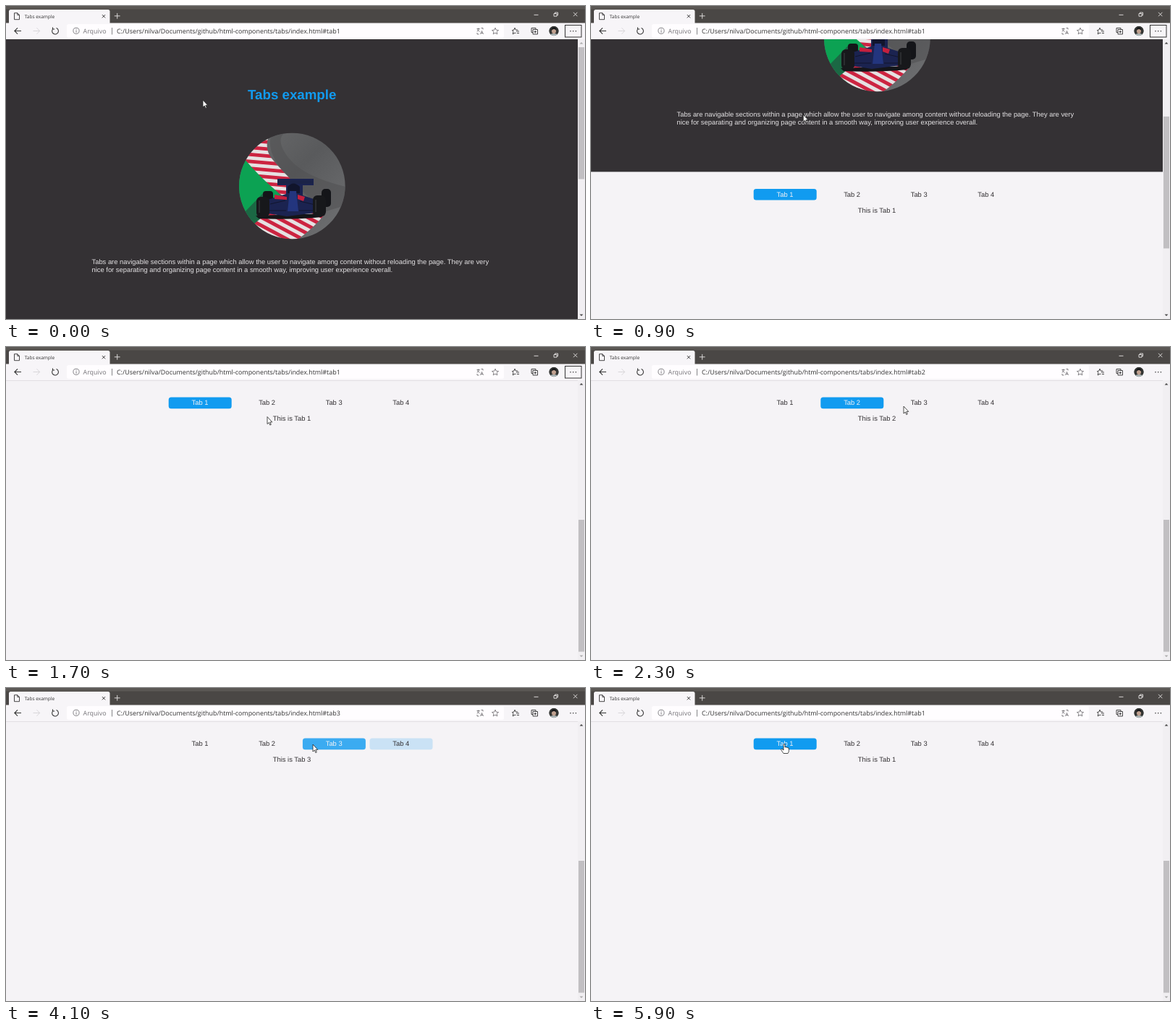
Recreate the animation shown at these times as an HTML page. Size 800 by 433 pixels, loop 6000 ms.

```html
<!DOCTYPE html>
<html lang="en">
<head>
<meta charset="utf-8">
<title>Tabs example</title>
<style>
  html, body { margin: 0; width: 100%; height: 100%; overflow: hidden; background: #f5f3f6; }
  svg { display: block; width: 800px; height: 433px; }
  text { font: 9.39px "Liberation Sans", Arial, sans-serif; text-rendering: geometricPrecision; }
  .ui { font: 8.92px "Open Sans", "Noto Sans", sans-serif; }
  .mid { text-anchor: middle; }
  .line { fill: none; stroke: #333; stroke-width: .9; }
</style>
</head>
<body>
<svg viewBox="0 0 800 433">
  <defs>
    <clipPath id="view"><rect y="46" width="790" height="387"/></clipPath>
    <clipPath id="round"><circle cx="395.3" cy="249" r="73.3"/></clipPath>
    <clipPath id="face"><circle cx="757" cy="34.5" r="6.8"/></clipPath>
    <linearGradient id="road" x2="1" y2="1">
      <stop offset="0" stop-color="#6b6c6d"/>
      <stop offset=".45" stop-color="#595a5c"/>
      <stop offset="1" stop-color="#717274"/>
    </linearGradient>
    <pattern id="kerbTop" width="200" height="9.6" patternUnits="userSpaceOnUse" patternTransform="rotate(5)">
      <rect width="200" height="9.6" fill="#e6e1e2"/><rect width="200" height="4.8" fill="#cc2441"/>
    </pattern>
    <pattern id="kerbLow" width="200" height="10" patternUnits="userSpaceOnUse" patternTransform="rotate(28)">
      <rect width="200" height="10" fill="#e6e1e2"/><rect width="200" height="5" fill="#cc2441"/>
    </pattern>
  </defs>

  <rect width="800" height="433" fill="#f5f3f6"/>
  <g clip-path="url(#view)">
    <g id="page">
      <rect y="46" width="790" height="387.4" fill="#343134"/>
      <text class="mid" x="395.2" y="129.3" fill="#119bf0" style="font-size:18.7px;font-weight:bold">Tabs example</text>
      <g clip-path="url(#round)">
        <rect x="321" y="175" width="149" height="148" fill="url(#road)"/>
        <path d="M366 180Q360 202 384 230T442 284L469 276V250Q412 236 392 212T384 176Z" fill="#505153" opacity=".55"/>
        <path d="M321 205L332 211L360 240L384 268L352 316L321 306Z" fill="#0ca253"/>
        <path d="M325 290L356 258L376 268L352 312Z" fill="#1b6844"/>
        <path d="M365 176Q355 196 368 212T404 250L384 264Q356 243 328 210L340 176Z" fill="url(#kerbTop)"/>
        <path d="M342 302L364 284L442 286Q424 309 400 325H362Z" fill="url(#kerbLow)"/>
        <g fill="#141519">
          <path d="M345 290L440 287L436 292Q396 296 349 294Z"/>
          <rect x="355" y="256" width="14" height="20" rx="4"/>
          <rect x="436" y="253" width="13" height="25" rx="5"/>
        </g>
        <path d="M375 239H425V248H410V262L428 268V286L388 291L362 287V268L387 260V248H375Z" fill="#1b2350"/>
        <path d="M376 241H424V246H376Z" fill="#1b2347"/>
        <path d="M389 250Q397 241 406 250V259H389Z" fill="#11152c"/>
        <path d="M392 256H401L404 284H389Z" fill="#23357e"/>
        <path d="M371 261L388 264V268L371 267ZM403 261L413 264L411 270L403 267ZM434 276H441V288H434Z" fill="#c4203e"/>
        <path d="M365 274L386 269M406 270L427 275M364 283H387M405 283H426" class="line" style="stroke:#10132a"/>
        <g fill="#17181b">
          <rect x="346" y="264" width="18" height="28" rx="6"/>
          <rect x="424" y="262" width="18" height="29" rx="6"/>
        </g>
        <path d="M350 269V286M428 268V285" class="line" style="stroke:#45464a"/>
      </g>
      <g fill="#e3e1e3">
        <text x="118.5" y="357.4">Tabs are navigable sections within a page which allow the user to navigate among content without reloading the page. They are very</text>
        <text x="118.5" y="368.1">nice for separating and organizing page content in a smooth way, improving user experience overall.</text>
      </g>
      <g id="tabs"></g>
      <text id="content" class="mid" x="395" y="489.8" fill="#343134"></text>
    </g>
  </g>

  <rect x="790" y="46" width="10" height="387" fill="#f1eff2"/>
  <rect id="thumb" x="791" y="57" width="8" height="182.5" fill="#c1bfc2"/>
  <path id="up" d="M792.6 52.6L795 50L797.4 52.6Z"/>
  <path id="down" d="M792.6 426.4L795 429L797.4 426.4Z"/>

  <rect width="800" height="24" fill="#4a4745"/>
  <rect width="800" height="4.5" fill="#5b5855"/>
  <rect y="23.5" width="800" height="22.5" fill="#f7f5f8"/>
  <path d="M4 24V7.5Q4 5 6.5 5H141Q143.5 5 143.5 7.5V24Z" fill="#f7f5f8"/>
  <text class="ui" x="25.8" y="16.6" fill="#333" style="font-size:6.5px">Tabs example</text>
  <path class="line" d="M11.5 9.7H15.8L18.5 12.4V18.7H11.5ZM15.8 9.7V12.4H18.5"/>
  <path class="line" d="M132.8 12L137.2 16.4M137.2 12L132.8 16.4"/>
  <path class="line" style="stroke:#e8e6e5" d="M149.8 13.8H157.6M153.7 9.9V17.7M729.5 12.3H735.5M784 8.8L789.4 14.2M789.4 8.8L784 14.2M757 10.5H761V14.2H757ZM758.5 10.3V9H762.5V12.8H761"/>

  <rect x="84" y="25" width="604" height="19" rx="2.5" fill="#fffdff"/>
  <path class="line" d="M21 34.5H12M16 30.3L11.8 34.5L16 38.7" style="stroke-width:1.1"/>
  <path class="line" d="M37.5 34.5H46.5M42.5 30.3L46.7 34.5L42.5 38.7" style="stroke:#d5d3d6"/>
  <path class="line" d="M65.2 31.3A4.4 4.4 0 1 0 69.5 30.5M64.5 29.5V32H67.2" style="stroke-width:1.1"/>
  <g class="line" style="stroke:#77757a">
    <circle cx="97" cy="34.3" r="4.1"/>
    <path d="M97 33.5V36.8M97 31.7V32.7M146.5 30V39.5"/>
  </g>
  <text class="ui" x="106.5" y="37.7" fill="#77757a">Arquivo</text>
  <text class="ui" id="url" x="153" y="37.7" fill="#333"></text>
  <g class="line" style="stroke:#666468;stroke-width:.8">
    <path d="M650.5 31.5H654.5M652.5 30.5V31.5M651 35.5L654 31.5M651 32.5L654.5 35.5M655.5 39L657.5 34.5L659.5 39M656.2 37.5H658.8M656.5 30.5H659V32.5M653.5 39H651V37"/>
    <path d="M676 30.2L677.3 33.2L680.5 33.5L678.1 35.7L678.8 38.9L676 37.2L673.2 38.9L673.9 35.7L671.5 33.5L674.7 33.2Z"/>
  </g>
  <g class="line">
    <path d="M703 30.2L704.3 33L707.3 33.2M704.5 37.5L703 37.2L700.2 38.9L700.9 35.7L699.5 33.5L701.7 33.2L703 30.2M705 35H709M706 37.5H709"/>
    <path d="M726 30.5H732V32.5M726 30.5V36.5H728M728 32.5H734.5V39H728ZM731.2 34V37.5M729.5 35.7H733"/>
  </g>
  <g clip-path="url(#face)">
    <circle cx="757" cy="34.5" r="7" fill="#343634"/>
    <path d="M750 42Q751 38 757 38T764 42Z" fill="#aab4b6"/>
    <ellipse cx="757" cy="34.6" rx="3" ry="3.8" fill="#c0a190"/>
    <path d="M753.6 34Q753.4 29.6 757 29.6T760.4 34Q759 32 757 32T753.6 34Z" fill="#17181a"/>
  </g>
  <rect id="focus" x="772.5" y="26.5" width="22.5" height="16.5" fill="none" stroke="#333"/>
  <g fill="#333"><circle cx="780" cy="34.7" r=".8"/><circle cx="783.7" cy="34.7" r=".8"/><circle cx="787.4" cy="34.7" r=".8"/></g>

  <g stroke="#222" stroke-width=".8" stroke-linejoin="round" fill="#fff">
    <path id="arrow" d="M0 0V10L2.3 8L3.8 11.5L5.3 10.8L3.8 7.4H6.8Z"/>
    <path id="hand" d="M-1 1Q0 -.5 1 1V5Q2.3 4 3 5.3Q4.4 4.5 5 5.9Q6.4 5.5 6.4 7V9.5Q6.4 11.5 5 13.5H-1Q-2.5 11.5 -4.3 8.5Q-4.6 7 -3.2 7.2L-1 9Z"/>
  </g>
</svg>
<script>
const LOOP = 6000, STEP = 100, FADE = 370, MAX_SCROLL = 387.3;
const TAB_X = 268, TAB_GAP = 92.6;

// [time, scroll offset]
const scrollKeys = [[200, 0], [300, 24], [400, 58], [500, 72], [600, 109.6], [700, 138],
  [900, 204], [1100, 256], [1300, 290.4], [1400, 290.4], [1500, 318], [1600, 358], [1700, MAX_SCROLL]];
// [time, x, y] of the pointer's hot spot
const pointerKeys = [[0, 272, 130], [600, 273, 148], [1000, 300, 151], [1300, 358, 162], [1600, 361, 115],
  [1800, 361, 78], [2100, 366, 79], [2300, 432, 82], [2500, 453, 78], [2750, 457, 78],
  [3100, 540, 78], [3250, 540, 78], [3400, 520, 78], [3700, 456, 78], [4000, 453, 78],
  [4300, 366, 78], [4500, 360, 78], [4800, 285, 80], [5100, 270, 78], [5900, 267, 77]];
// [time, selected tab]
const clicks = [[-1000, 1], [1900, 2], [2600, 3], [3200, 4], [3800, 3], [4400, 2], [5200, 1]];

const $ = id => document.getElementById(id);
const svg = (name, attrs, parent) => {
  const el = document.createElementNS("http://www.w3.org/2000/svg", name);
  for (const key in attrs) el.setAttribute(key, attrs[key]);
  return parent.appendChild(el);
};

const tabs = [1, 2, 3, 4].map((n, i) => {
  const x = TAB_X + i * TAB_GAP;
  const box = svg("rect", { x: x - 43.3, y: 456.9, width: 87, height: 15.6, rx: 3.5, fill: "#119bf0" }, $("tabs"));
  const label = svg("text", { x, y: 467.5, class: "mid" }, $("tabs"));
  label.textContent = "Tab " + n;
  return { x, box, label };
});

// Linear interpolation between the keys around time t
function sample(keys, t) {
  const next = keys.findIndex(k => k[0] > t);
  if (next === 0) return keys[0].slice(1);
  if (next < 0) return keys[keys.length - 1].slice(1);
  const a = keys[next - 1], b = keys[next];
  const p = (t - a[0]) / (b[0] - a[0]);
  return a.slice(1).map((v, i) => v + (b[i + 1] - v) * p);
}

function show(el, on) {
  el.setAttribute("visibility", on ? "visible" : "hidden");
}

function draw(t) {
  const [scroll] = sample(scrollKeys, t);
  $("page").setAttribute("transform", `translate(0 ${-scroll})`);
  $("thumb").setAttribute("y", 57 + scroll * 0.47);
  $("up").setAttribute("fill", scroll > 0 ? "#444" : "#aaa");
  $("down").setAttribute("fill", scroll < MAX_SCROLL ? "#444" : "#aaa");

  const current = clicks.filter(c => c[0] <= t).length - 1;
  const [time, active] = clicks[current];
  const previous = current ? clicks[current - 1][1] : 0;
  const p = Math.min(1, (t - time) / FADE);
  tabs.forEach(({ box, label }, i) => {
    const n = i + 1;
    box.setAttribute("opacity", n === active ? p : n === previous ? 1 - p : 0);
    label.setAttribute("fill", n === active ? "#f5f3f6" : "#343134");
  });
  $("content").textContent = "This is Tab " + active;
  $("url").textContent = "C:/Users/nilva/Documents/github/html-components/tabs/index.html#tab" + active;
  show($("focus"), current === 0);

  const [x, y] = sample(pointerKeys, t);
  const textY = 464.5 - scroll;
  const onLink = Math.abs(y - textY) < 6 && tabs.some(tab => Math.abs(x - tab.x) < 12);
  for (const id of ["arrow", "hand"]) {
    $(id).setAttribute("transform", `translate(${x} ${y})`);
    show($(id), (id === "hand") === onLink);
  }
}

const start = performance.now();
function tick() {
  const t = (performance.now() - start) % LOOP;
  draw(Math.floor(t / STEP) * STEP);
  requestAnimationFrame(tick);
}
tick();
</script>
</body>
</html>
```
